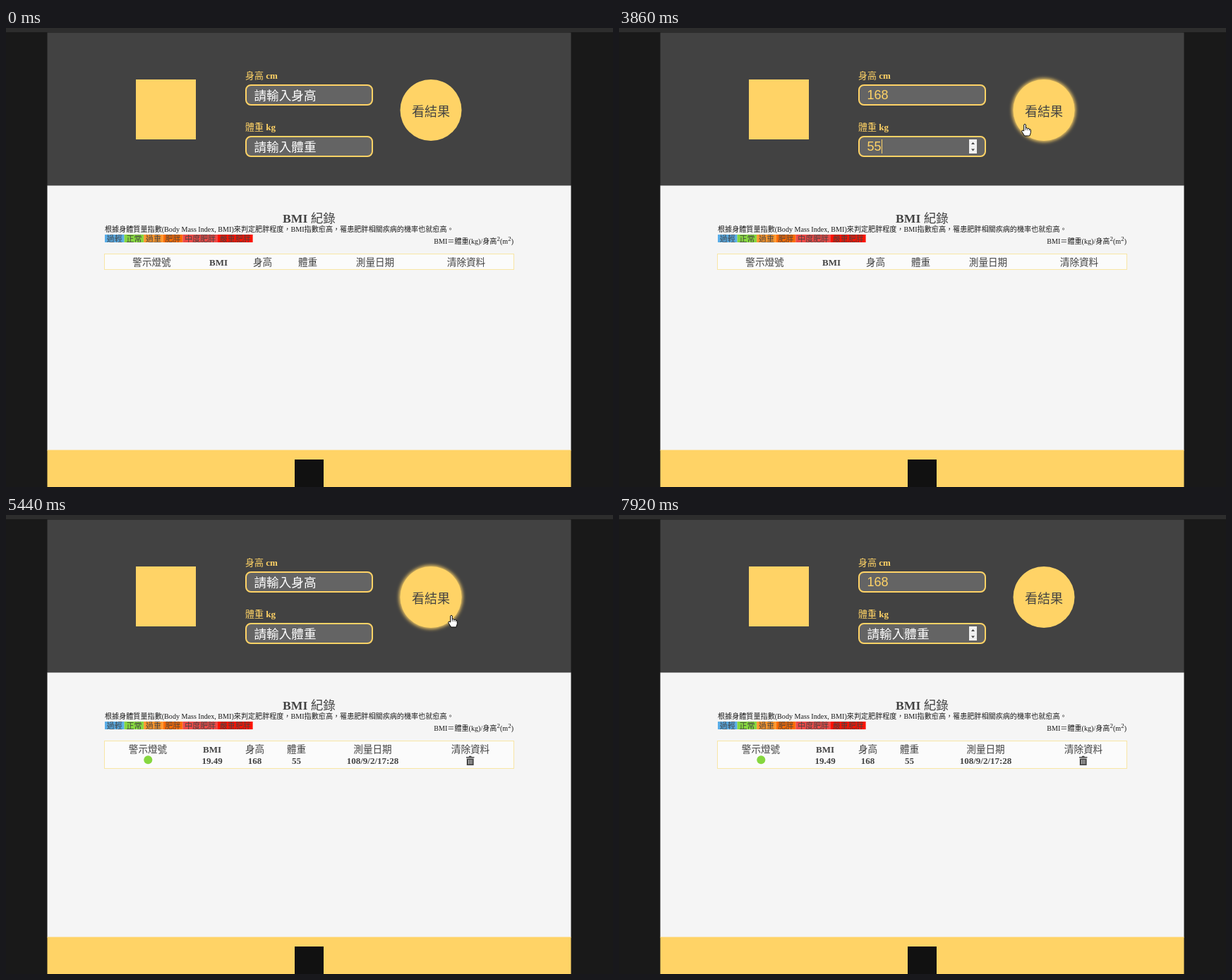
Recreate the animation shown at these times as an HTML page. Size 860 px wide and 651 px high, loop 8000 ms.

```html
<!DOCTYPE html>
<html lang="zh-Hant">
<head>
<meta charset="utf-8">
<title>BMI</title>
<style>
html, body { margin: 0; width: 100%; height: 100%; overflow: hidden; background: #191919; }
svg { display: block; width: 860px; height: 651px; }
text { font-family: "Liberation Serif", "Noto Sans CJK TC", "Noto Sans CJK", serif; fill: #424242; white-space: pre; }
.b { font-weight: bold; }
.mid { text-anchor: middle; }
.end { text-anchor: end; }
.label { font-size: 13px; fill: #ffd366; }
.hint { font-size: 17.6px; font-weight: 300; fill: #fff; }
.value { font: 18px "Liberation Sans", Arial, sans-serif; fill: #ffd366; }
.small { font-size: 10.1px; fill: #1a1a1a; }
.tag { font-size: 11px; font-weight: 500; }
.head { font-size: 13.6px; font-weight: 500; }
.cell { font-size: 13px; font-weight: bold; }
.box { fill: #646464; stroke: #ffd366; stroke-width: 2; }
.green text { fill: #86d73f; }
</style>
</head>
<body>
<svg id="stage" viewBox="0 0 860 651">
  <defs><filter id="blur" x="-30%" y="-30%" width="160%" height="160%"><feGaussianBlur stdDeviation="2.6"/></filter></defs>
  <rect width="860" height="6" fill="#2d2d2d"/>
  <rect x="58.5" y="6.5" width="742" height="217.5" fill="#424242"/>
  <rect x="58.5" y="223.5" width="742" height="376" fill="#f5f5f5"/>
  <rect x="58.5" y="598.5" width="742" height="53" fill="#ffd366"/>
  <rect x="184" y="73" width="85" height="85" fill="#ffd366"/>
  <rect x="409" y="612" width="41" height="41" fill="#111"/>

  <text class="label" x="339" y="72.2">身高 <tspan class="b">cm</tspan></text>
  <text class="label" x="339" y="145.2">體重 <tspan class="b">kg</tspan></text>
  <g id="fields"></g>

  <g id="button">
    <circle id="glow" cx="602" cy="116.5" r="45" fill="#ffd366" filter="url(#blur)"/>
    <circle cx="602" cy="116.5" r="43.5" fill="#ffd366"/>
    <text class="mid" x="602" y="125.3" font-size="18">看結果</text>
  </g>
  <g id="result" class="green">
    <circle cx="602" cy="116.5" r="41.4" fill="none" stroke="#86d73f" stroke-width="4.2"/>
    <text class="mid b" x="602" y="113" font-size="23">19.49</text>
    <text class="mid b" x="602" y="128.5" font-size="10">BMI</text>
    <text x="665" y="126.8" font-size="19.3">正常</text>
    <circle cx="636.5" cy="147" r="9" fill="#86d73f"/>
    <path d="M632.4 147a4.3 4.3 0 0 1 7.6-2.6M640.6 147a4.3 4.3 0 0 1-7.6 2.6" fill="none" stroke="#424242" stroke-width="1.5"/>
    <path d="M641.4 142.3v3.6h-3.6zM631.6 151.7v-3.6h3.6z" fill="#424242"/>
  </g>

  <text class="mid" x="429.5" y="275.6" font-size="17.6"><tspan class="b">BMI</tspan> 紀錄</text>
  <text class="small" x="140" y="288.7">根據身體質量指數(Body Mass Index, BMI)來判定肥胖程度，BMI指數愈高，罹患肥胖相關疾病的機率也就愈高。</text>
  <g id="tags"></g>
  <text class="small end" x="719" y="305.5">BMI＝體重(kg)/身高<tspan dy="-4" font-size="9">2</tspan><tspan dy="4">(m</tspan><tspan dy="-4" font-size="9">2</tspan><tspan dy="4">)</tspan></text>
  <g id="empty"></g>
  <g id="filled"></g>

  <g id="arrow"><path d="M.5.5V13l3-2.7 2 4.5 2-.9-2-4.4h4z" fill="#fff" stroke="#000" stroke-width=".9"/></g>
  <g id="beam"><path d="M-2.5-6h2l.5.6.5-.6h2M0-5.6V5.6M-2.5 6h2l.5-.6.5.6h2" fill="none" stroke="#929292" stroke-width="1"/></g>
  <g id="hand">
    <path d="M-1.3 10V1.2Q0-.7 1.3 1.2V6Q3.4 4.8 3.9 6.6 5.8 5.6 6.4 7.4 8.2 7 8.3 9V12.5L6.8 17H-.4L-4.3 10.8Q-4.4 8.6-2.8 9.2Z" fill="#fff" stroke="#000" stroke-width="1" stroke-linejoin="round"/>
    <path d="M1.3 6V9M3.9 6.6V9.2M6.4 7.4V9.5" stroke="#000" stroke-width=".7"/>
  </g>
</svg>
<script>
const $ = id => document.getElementById(id);

function add(parent, tag, attrs, content) {
  const el = document.createElementNS('http://www.w3.org/2000/svg', tag);
  for (const k in attrs) el.setAttribute(k, attrs[k]);
  if (content) el.textContent = content;
  return parent.appendChild(el);
}
const show = (el, on) => el.setAttribute('visibility', on ? 'inherit' : 'hidden');

function makeField(y, hint) {
  const g = add($('fields'), 'g', { transform: `translate(0 ${y})` });
  add(g, 'rect', { class: 'box', x: 340, y: 1, width: 179, height: 28, rx: 7 });
  const field = {
    hint: add(g, 'text', { class: 'hint', x: 351.5, y: 22 }, hint),
    value: add(g, 'text', { class: 'value', x: 351.5, y: 21 }),
    spin: add(g, 'g', {}),
    caret: add(g, 'rect', { y: 5, width: 1, height: 20, fill: '#ffd366' })
  };
  add(field.spin, 'rect', { x: 496, y: 5, width: 11, height: 20, fill: '#f0f0f0' });
  add(field.spin, 'path', { d: 'M499 12l2.5-3 2.5 3zM499 18.5l2.5 3 2.5-3z', fill: '#444' });
  return field;
}
const fields = { height: makeField(80, '請輸入身高'), weight: makeField(153, '請輸入體重') };

let tagX = 140;
[['過輕', '#5aaee8'], ['正常', '#86d73f'], ['過重', '#ff982d'],
 ['肥胖', '#ff6c02'], ['中度肥胖', '#ec4a48'], ['嚴重肥胖', '#ff1200']].forEach(([name, fill]) => {
  const width = name.length * 11 + 5.6;
  add($('tags'), 'rect', { x: tagX, y: 293, width, height: 11, fill });
  add($('tags'), 'text', { class: 'tag', x: tagX + 2.8, y: 302.6 }, name);
  tagX += width;
});

const heads = ['警示燈號', 'BMI', '身高', '體重', '測量日期', '清除資料'];
function makeTable(g, height, centers) {
  add(g, 'rect', { x: 139.5, y: 320.5, width: 580, height, fill: '#fbfbfb', stroke: '#f8e6a5' });
  heads.forEach((h, i) => add(g, 'text', { class: h === 'BMI' ? 'cell mid' : 'head mid', x: centers[i], y: 336.5 }, h));
}
const columns = [201, 292, 352.5, 411.5, 519.5, 658];
makeTable($('empty'), 22, [206.5, 301, 363.5, 427.5, 523, 652]);
makeTable($('filled'), 39, columns);
['', '19.49', '168', '55', '108/9/2/17:28'].forEach((v, i) =>
  v && add($('filled'), 'text', { class: 'cell mid', x: columns[i], y: 353 }, v));
add($('filled'), 'circle', { cx: 201.3, cy: 347.3, r: 6, fill: '#86d73f' });
add($('filled'), 'path', {
  d: 'M652 343h3.6l.8-1.2h2.6l.8 1.2h3.6v1.6H652zM652.8 345.4h9.8V355h-9.8z', fill: '#424242'
});
add($('filled'), 'path', { d: 'M655.5 347v6.4M657.7 347v6.4M659.9 347v6.4', stroke: '#fbfbfb', 'stroke-width': .8 });

// Each step changes only the named parts of the state.
const steps = [
  [0, { height: '', weight: '', spin: '', caret: '', mouse: '', glow: false, result: false, table: false }],
  [200, { mouse: 'arrow 741 573' }],
  [390, { mouse: 'arrow 610 385' }],
  [580, { mouse: 'arrow 455 170' }],
  [770, { mouse: 'beam 385 101', spin: 'height' }],
  [970, { caret: 'height' }],
  [1400, { height: '1' }],
  [1810, { height: '16' }],
  [2010, { height: '168' }],
  [2210, { mouse: 'arrow 384 131' }],
  [2410, { mouse: 'beam 383 166' }],
  [2620, { spin: 'weight', caret: 'weight' }],
  [2820, { mouse: 'arrow 382 185' }],
  [3050, { weight: '5' }],
  [3250, { weight: '55' }],
  [3450, { mouse: 'arrow 432 187' }],
  [3650, { mouse: 'arrow 530 160' }],
  [3860, { mouse: 'hand 575 136', glow: true }],
  [4050, { mouse: 'arrow 574 136', glow: false, result: true, table: true, spin: '', caret: '' }],
  [4270, { mouse: 'arrow 586 155' }],
  [4470, { mouse: 'arrow 607 174' }],
  [4660, { mouse: 'arrow 627 167' }],
  [4860, { mouse: 'hand 638 152' }],
  [5060, { mouse: 'hand 635 145' }],
  [5260, { mouse: 'hand 631 142' }],
  [5440, { height: '', weight: '', result: false, glow: true }],
  [5650, { mouse: 'arrow 545 121', glow: false }],
  [5850, { mouse: 'beam 438 104', spin: 'height' }],
  [6070, { caret: 'height' }],
  [6300, { height: '1' }],
  [6690, { height: '16' }],
  [6890, { height: '168' }],
  [7100, { mouse: 'arrow 420 134' }],
  [7300, { mouse: 'beam 404 167' }],
  [7500, { spin: 'weight', caret: 'weight' }],
  [7920, { caret: '' }]
];

function draw(t) {
  const s = {};
  for (const [at, change] of steps) if (at <= t) Object.assign(s, change);

  for (const name in fields) {
    const f = fields[name];
    f.value.textContent = s[name];
    show(f.hint, !s[name]);
    show(f.spin, s.spin === name);
    show(f.caret, s.caret === name);
    f.caret.setAttribute('x', 352 + s[name].length * 10);
  }
  show($('button'), !s.result);
  show($('glow'), s.glow);
  show($('result'), s.result);
  show($('empty'), !s.table);
  show($('filled'), s.table);

  const [kind, x, y] = s.mouse.split(' ');
  for (const id of ['arrow', 'beam', 'hand']) {
    show($(id), id === kind);
    if (id === kind) $(id).setAttribute('transform', `translate(${x} ${y})`);
  }
}

const start = performance.now();
function tick() {
  draw((performance.now() - start) % 8000);
  requestAnimationFrame(tick);
}
tick();
</script>
</body>
</html>
```
